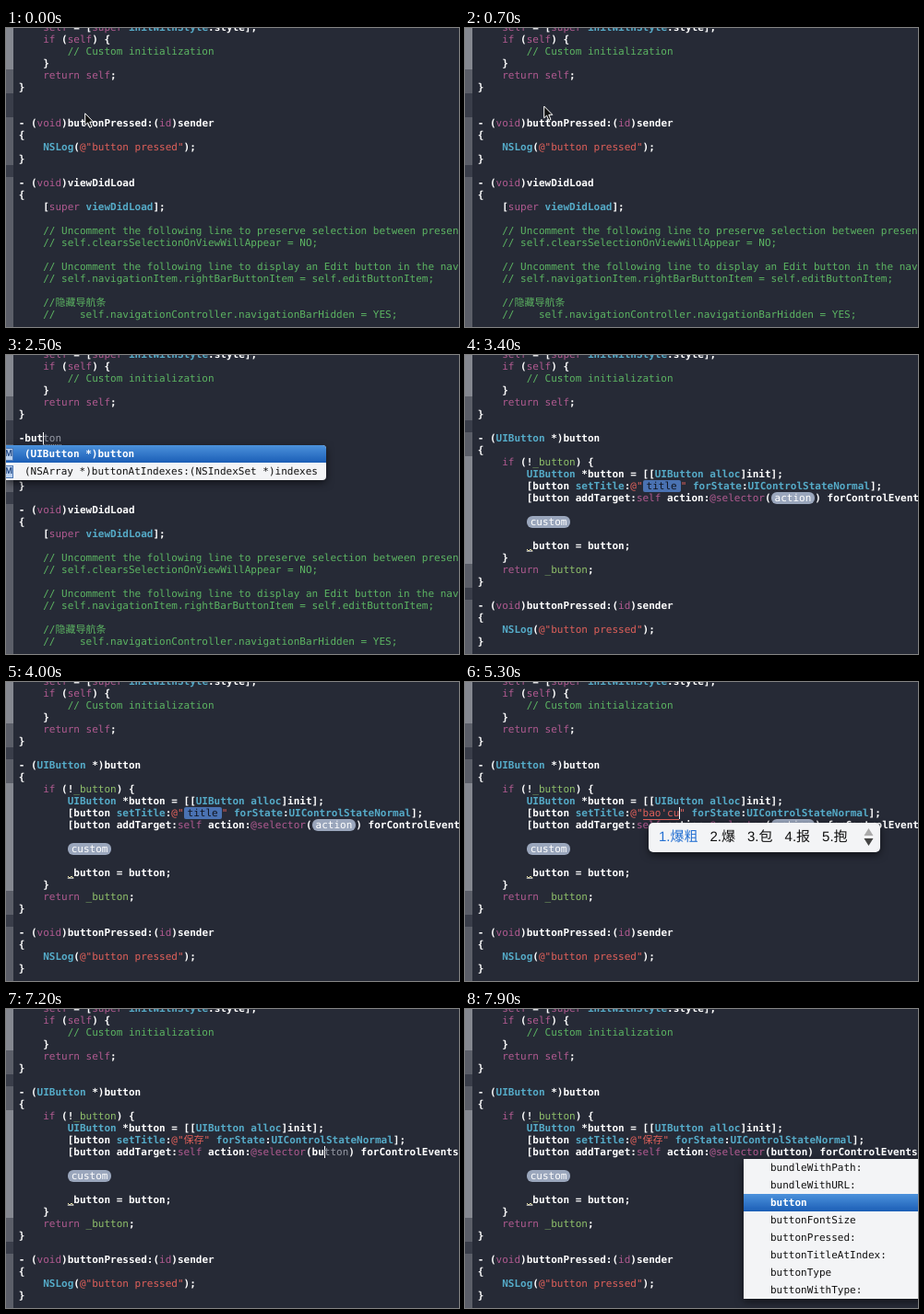
These frames come from a looping animation (491x325 px, 8 s). An HTML page:

```html
<!DOCTYPE html>
<html lang="en">
<head>
<meta charset="utf-8">
<style>
html, body { margin: 0; width: 100%; height: 100%; overflow: hidden; background: #262a36; }
body { position: relative; font: 11px/13px "DejaVu Sans Mono", "Noto Sans CJK SC", "Noto Sans CJK", monospace; text-rendering: geometricPrecision; }
pre { position: absolute; left: 13.7px; top: -7px; margin: 0; font: inherit; font-weight: bold; color: #fff; }
pre span { font-weight: normal; }
.comment { color: #5cb462; }
.string { color: #e0605a; }
.key { color: #b05a90; }
pre .type { color: #55abc8; font-weight: bold; }
.ivar { color: #8fc06a; }
.hint { color: #969aa5; }
.dotted { border-bottom: 1px dotted #969aa5; }
.pill { padding: 0 4px; border-radius: 6px; background: #9aa6bc; color: #fff; }
.pill.on { border-radius: 2px; background: #4a72b2; color: #10141f; }
.compose { border-bottom: 1px solid #e0605a; }
.caret { border-left: 1px solid #fff; margin-right: -1px; }
#gutter { position: absolute; left: 0; top: 0; width: 8px; height: 100%; background: #3a3e4a; }
#gutter div { position: absolute; width: 8px; }
.list, .ime { position: absolute; color: #111; background: #f3f4f6; box-shadow: 0 3px 8px #0008; }
.list { line-height: 19px; white-space: pre; border-radius: 0 4px 4px 0; overflow: hidden; }
.list .on { color: #fff; font-weight: bold; background: linear-gradient(#4c92dc, #1b5eb6); }
.list i { position: absolute; left: -6px; width: 12px; height: 12px; margin-top: 3px; border: 1px solid #4d78b4; background: #b9d0ee; color: #234a86; font: bold 10px/12px "Liberation Sans", sans-serif; text-align: right; }
.ime { left: 199px; top: 153px; height: 32px; padding: 0 35px 0 11px; display: flex; gap: 13px; border-radius: 5px; font: 15px/32px "Liberation Sans", "Noto Sans CJK SC", "Noto Sans CJK", sans-serif; white-space: nowrap; }
.ime :first-child { color: #2470d2; }
.ime svg { position: absolute; right: 7px; top: 6px; }
#mouse { position: absolute; left: 0; top: 0; }
</style>
</head>
<body>
<div id="gutter"></div>
<pre id="code"></pre>
<div id="popup"></div>
<svg id="mouse" width="12" height="18"><path d="M.7 .8V13.6L3.6 10.9 5.8 16.2 8 15.2 5.8 10.1H9.8Z" fill="#111" stroke="#fff"/></svg>
<script>
const $ = id => document.getElementById(id);

const top_ = `    self = [super initWithStyle:style];
    if (self) {
        // Custom initialization
    }
    return self;
}

`;
const pressed = `
- (void)buttonPressed:(id)sender
{
    NSLog(@"button pressed");
}
`;
const loaded = `
- (void)viewDidLoad
{
    [super viewDidLoad];

    // Uncomment the following line to preserve selection between presentations.
    // self.clearsSelectionOnViewWillAppear = NO;

    // Uncomment the following line to display an Edit button in the navigation bar.
    // self.navigationItem.rightBarButtonItem = self.editButtonItem;

    //隐藏导航条
    //    self.navigationController.navigationBarHidden = YES;
`;
const getter = (title, action) => `- (UIButton *)button
{
    if (!_button) {
        UIButton *button = [[UIButton alloc]init];
        [button setTitle:@"${title}" forState:UIControlStateNormal];
        [button addTarget:self action:@selector(${action}) forControlEvents:UIControlEventTouchUpInside];

        «custom»

        _button = button;
    }
    return _button;
}
`;

// Inline marks: «placeholder», «!selected», ‹hint›, ⟨composing⟩, ¦ caret
const marks = s => s
  .replace(/«(!?)(.*?)»/g, (_, on, name) => `<span class="pill ${on && "on"}">${name}</span>`)
  .replace(/‹(!?)(.*?)›/g, (_, on, rest) => `<span class="hint ${on && "dotted"}">${rest}</span>`)
  .replace(/⟨(.*?)⟩/g, '<span class="compose">$1</span>')
  .replace(/¦/g, '<span class="caret"></span>');
const syntax = /(?<comment>\/\/.*)|(?<string>@"[^"]*")|(?<key>\b(?:if|return|self|super|void|id)\b|@selector)|(?<type>NSLog|UIButton|UIControl\w+|setTitle|forState|alloc|(?<=super )\w+)|(?<ivar>(?<=!|return )_button)|(?<mark>«.*?»|‹.*?›|¦)/g;
const paint = src => src.replace(syntax, (m, ...rest) => {
  const groups = rest.pop();
  const kind = Object.keys(groups).find(k => groups[k]);
  return kind == "mark" ? marks(m) : `<span class="${kind}">${marks(m)}</span>`;
});

// Value of the last [time, value] step already reached
const at = (steps, t) => steps.reduce((v, [start, next]) => t >= start ? next : v, "");

const draft = [[0, ""], [1000, "¦"], [1400, "-¦"], [1800, "-b¦‹utton›"], [1900, "-bu¦‹tton›"],
  [2000, "-but¦‹!ton›"], [2600, "- (UIButton *)button¦"], [3200, "- (UIButton *)button"]];
const title = [[0, "«!title»"], [4900, "⟨b⟩¦"], [5000, "⟨ba⟩¦"], [5100, "⟨bao⟩¦"], [5200, "⟨bao'c⟩¦"],
  [5300, "⟨bao'cu⟩¦"], [5400, "⟨bao'cun⟩¦"], [5600, "保存¦"], [6100, "保存"]];
const action = [[0, "«action»"], [6300, "«!action»"], [7100, "b¦‹utton›"], [7200, "bu¦‹tton›"], [7400, "button"]];
const words = [[4900, "不 把 吧 被 比"], [5000, "吧 把 八 爸 罢"], [5100, "包 报 抱 爆 保"],
  [5200, "保持 爆 包 报 抱"], [5300, "爆粗 爆 包 报 抱"], [5400, "保存 爆 包 报 抱"], [5600, ""]];

const list = (x, y, w, pad, on, items, icon = "") =>
  `<div class="list" style="left:${x}px;top:${y}px;width:${w}px">` + items.map((s, i) =>
    `<div class="${i == on ? "on" : ""}" style="padding-left:${pad}px">${icon}${s}</div>`).join("") + "</div>";

function popup(t) {
  if (t >= 2500 && t < 2600)
    return list(0, 98, 347, 20, 0, ["(UIButton *)button", "(NSArray *)buttonAtIndexes:(NSIndexSet *)indexes"], "<i>M</i>");
  if (t >= 7300)
    return list(302, 163, 200, 29, 2, ["bundleWithPath:", "bundleWithURL:", "button", "buttonFontSize",
      "buttonPressed:", "buttonTitleAtIndex:", "buttonType", "buttonWithType:"]);
  const found = at(words, t);
  return found && '<div class="ime">' + found.split(" ").map((w, i) => `<span>${i + 1}.${w}</span>`).join("") +
    '<svg width="11" height="20"><path d="M.5 8 5.5 0 10.5 8Z" fill="#aaa"/><path d="M.5 11 5.5 19 10.5 11Z" fill="#444"/></svg></div>';
}

// Folding ribbon: [first row, end row, nested]
const ribbon = done => [[-1, 5], [-1, 3, 1], ...done ? [[6, 19], [8, 17, 1], [20, 25]] : [[7, 11], [12, 25]]]
  .map(([a, b, deep]) => `<div style="top:${6 + a * 13}px;height:${(b - a) * 13}px;background:${deep ? "#858890" : "#5b5e68"}"></div>`).join("");
const squiggle = '<svg style="position:absolute;left:67px;top:210px" width="8" height="5"><path d="M0 1 2 3 4 1 6 3" fill="none" stroke="#e8dfa0"/></svg>';

const shown = {};
function put(id, html) {
  if (shown[id] !== html) $(id).innerHTML = shown[id] = html;
}

function frame(now) {
  const t = now % 8000, done = t >= 3400;
  put("code", paint(top_ + (done ? getter(at(title, t), at(action, t)) + pressed : at(draft, t) + pressed + loaded)));
  put("gutter", ribbon(done));
  put("popup", popup(t) + (done ? squiggle : ""));
  const step = Math.min(9, Math.floor(t / 100));
  $("mouse").style.transform = `translate(85px, ${92 - step * 10 / 9}px)`;
  $("mouse").style.display = t < 1400 ? "" : "none";
  requestAnimationFrame(frame);
}
requestAnimationFrame(frame);
</script>
</body>
</html>
```
